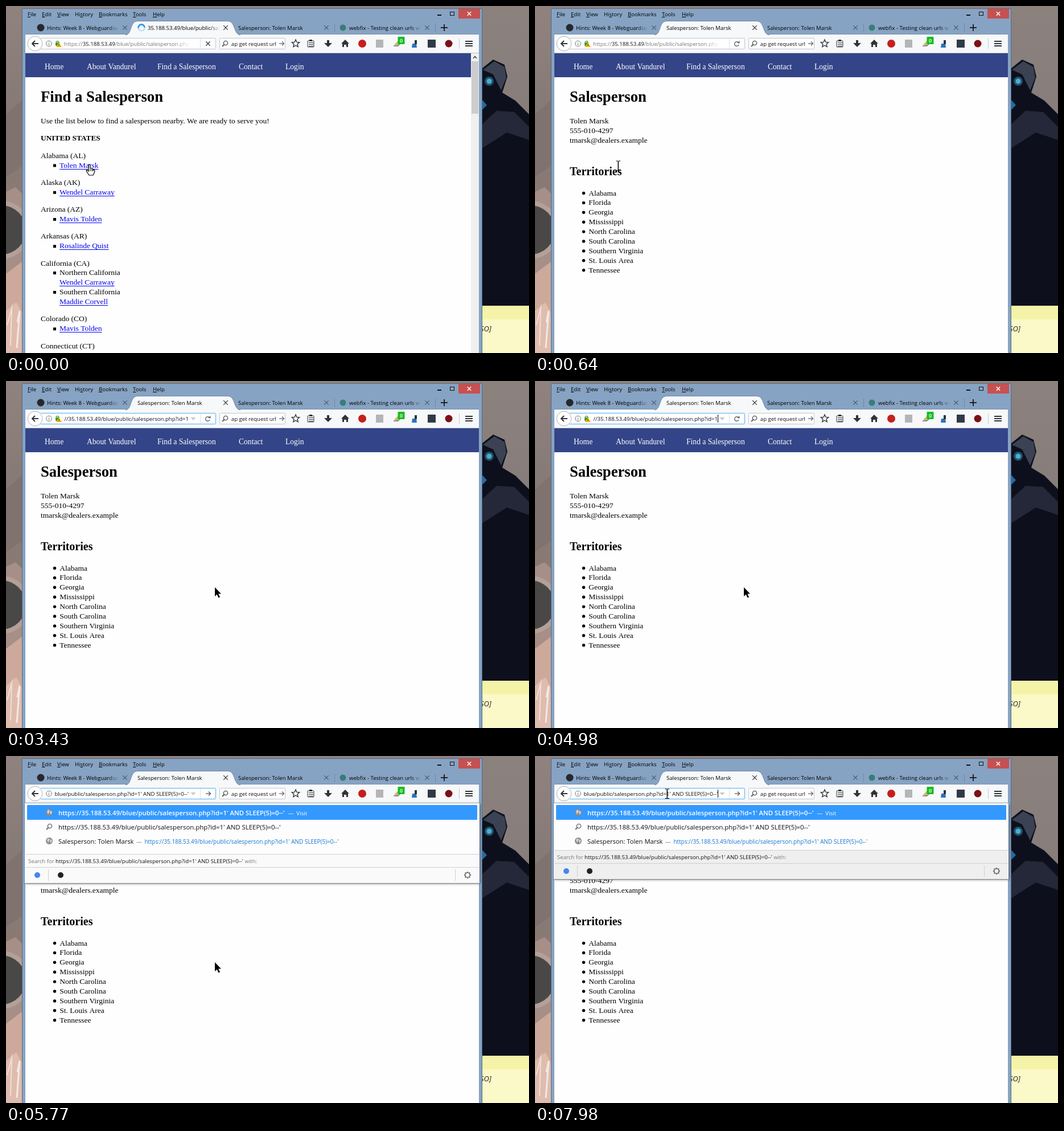
Animation, 919 px wide and 609 px high, one loop 8000 ms. Source, as an HTML page with a canvas:

```html
<!DOCTYPE html>
<html lang="en">
<head>
<meta charset="utf-8">
<title>Browser session</title>
<style>
html, body { margin: 0; width: 100%; height: 100%; overflow: hidden; }
canvas { display: block; }
</style>
</head>
<body>
<canvas id="stage" width="919" height="609"></canvas>
<script>
const c = document.getElementById('stage').getContext('2d');
const LOOP = 8000;
const PERSON = 'Tolen Marsk';
const HOST = '35.188.53.49';
const PATH = '/blue/public/salesperson.php';
const URL_ID = `https://${HOST}${PATH}?id=1`;
const URL_FULL = `${URL_ID}' AND SLEEP(5)=0--'`;

const sans = (size, weight = 400) => `${weight} ${size}px "Open Sans", "Noto Sans", sans-serif`;
const serif = (size, weight = 400) => `${weight} ${size}px "Liberation Serif", serif`;
const UI = sans(9.6);
const BODY = serif(13.5);

function rect(x, y, w, h, color) {
  c.fillStyle = color;
  c.fillRect(x, y, w, h);
}

function text(s, x, y, font = BODY, color = '#000', align = 'left') {
  c.font = font;
  c.fillStyle = color;
  c.textAlign = align;
  c.fillText(s, x, y);
  return c.measureText(s).width;
}

function dot(x, y, r, color) {
  c.fillStyle = color;
  c.beginPath();
  c.arc(x, y, r, 0, 7);
  c.fill();
}

function ring(x, y, r, color, width = 1, from = 0, to = 7) {
  c.strokeStyle = color;
  c.lineWidth = width;
  c.beginPath();
  c.arc(x, y, r, from, to);
  c.stroke();
}

function trace(points, x = 0, y = 0) {
  c.beginPath();
  for (let i = 0; i < points.length; i += 2) c.lineTo(x + points[i], y + points[i + 1]);
}

function line(points, color, width = 1) {
  trace(points);
  c.strokeStyle = color;
  c.lineWidth = width;
  c.stroke();
}

function poly(points, color, x = 0, y = 0) {
  trace(points, x, y);
  c.closePath();
  c.fillStyle = color;
  c.fill();
}

function box(x, y, w, h, r, fill, stroke) {
  c.beginPath();
  c.roundRect(x, y, w, h, r);
  c.fillStyle = fill;
  c.fill();
  if (stroke) {
    c.strokeStyle = stroke;
    c.lineWidth = 1;
    c.stroke();
  }
}

function clipped(x, y, w, h, draw) {
  c.save();
  c.beginPath();
  c.rect(x, y, w, h);
  c.clip();
  draw();
  c.restore();
}

function gradient(x0, y0, x1, y1, ...colors) {
  const g = c.createLinearGradient(x0, y0, x1, y1);
  colors.forEach((color, i) => g.addColorStop(i / (colors.length - 1), color));
  return g;
}

function fadedText(s, x, y, end) {
  const fade = gradient(end - 18, 0, end, 0, 'rgba(0,0,0,1)', 'rgba(0,0,0,0)');
  clipped(x, y - 14, end - x, 20, () => text(s, x, y, UI, fade));
}

function cross(x, y, r, color, width = 1.2) {
  line([x - r, y - r, x + r, y + r], color, width);
  line([x - r, y + r, x + r, y - r], color, width);
}

function arrowRight(x, y, color) {
  line([x - 4, y, x + 4, y], color, 1.3);
  line([x + 1, y - 3.5, x + 4.5, y, x + 1, y + 3.5], color, 1.3);
}

function magnifier(x, y, color) {
  ring(x + 1, y - 1, 3.6, color, 1.4);
  line([x - 1.5, y + 1.5, x - 5, y + 5], color, 1.8);
}

function drawWallpaper() {
  rect(0, 0, 919, 609, gradient(0, 0, 0, 609, '#8f827f', '#857975', '#8d7a73', '#bd9d92'));
  poly([0, 190, 29, 165, 29, 280, 0, 300], '#80726e');
  poly([0, 326, 17, 318, 29, 330, 29, 470, 0, 470], '#a68f87');
  dot(-8, 393, 51, '#b3a098');
  dot(-8, 393, 43, '#4a4747');
  poly([0, 470, 29, 448, 29, 609, 0, 609], '#cda99b');
  poly([0, 535, 18, 520, 29, 540, 29, 609, 0, 609], '#dfbcae');
  line([2, 560, 10, 530, 8, 596], '#eee0d8', 2);
  line([20, 555, 24, 535, 19, 600], '#f4e8e2', 3);

  rect(832, 0, 87, 526, gradient(0, 0, 0, 526, '#8b817d', '#857b79', '#65606a'));
  poly([836, 110, 856, 94, 876, 103, 881, 124, 872, 152, 895, 166, 919, 190,
    919, 526, 836, 526], '#0d101c');
  poly([838, 112, 858, 97, 876, 107, 879, 126, 870, 148, 856, 120], '#3a4253');
  poly([836, 208, 862, 184, 893, 186, 919, 212, 919, 235, 880, 222, 836, 250], '#242838');
  dot(849, 132, 8, '#24516a');
  dot(849, 132, 4.5, '#46b0d0');
  poly([837, 165, 845, 174, 837, 182], '#236ba4');

  rect(832, 526, 87, 83, '#fbf9c7');
  rect(832, 526, 87, 24, '#f5f3a7');
  text('SO]', 833, 571, 'italic 13px "Noto Sans", sans-serif', '#35352b');
}

function drawTab(x, title, titleX) {
  fadedText(title, titleX, 41.5, x + 142);
  cross(x + 153, 38, 3.7, '#4d5a6a');
}

function drawWindow() {
  rect(28, 4, 809, 605, '#87a3c3');
  line([28.5, 609, 28.5, 4.5, 836.5, 4.5, 836.5, 609], '#536b87');
  const menus = [['File', 38], ['Edit', 63], ['View', 90], ['History', 121], ['Bookmarks', 163], ['Tools', 223], ['Help', 258]];
  for (const [label, x] of menus) {
    text(label, x, 17.5, UI);
    const at = label === 'History' ? 2 : 0;
    const before = c.measureText(label.slice(0, at)).width;
    rect(x + before, 19, c.measureText(label[at]).width, 1, '#000');
  }
  rect(758, 15, 7, 2, '#111');
  c.strokeStyle = '#111';
  c.strokeRect(780.5, 10.5, 7, 6);
  rect(795, 5, 38, 17, '#c75050');
  cross(814, 13.5, 3.2, '#fff', 1.5);
  rect(34, 50, 797, 33, '#f6f8fa');
  line([34, 49.5, 831, 49.5], '#768fac');
  line([34, 82.5, 831, 82.5], '#bcc4ce');
  line([577.5, 31, 577.5, 46], '#6f88a5');
  line([754.5, 31, 754.5, 46], '#6f88a5');
  dot(61, 38, 6.5, '#25282d');
  drawTab(56, 'Hints: Week 8 - Webguardianship', 72);
  drawTab(410, `Salesperson: ${PERSON}`, 408);
  dot(592, 38, 5.5, '#397d78');
  drawTab(587, 'webfix - Testing clean urls with it', 603);
  line([764, 38, 776, 38], '#111', 1.7);
  line([770, 32, 770, 44], '#111', 1.7);
  c.beginPath();
  c.moveTo(210, 51);
  c.bezierCurveTo(222, 50, 217, 27, 231, 26.5);
  c.lineTo(390, 26.5);
  c.bezierCurveTo(404, 27, 399, 50, 412, 51);
  c.fillStyle = '#f6f8fa';
  c.fill();
  c.strokeStyle = '#7189a6';
  c.lineWidth = 1;
  c.stroke();
  cross(386, 38, 3.8, '#333');
}

function drawActiveTab(t) {
  const loading = t < 520;
  if (loading) {
    ring(238, 38, 5.5, '#c1ddf6', 2.5);
    const turn = t < 120 ? 3 : t < 370 ? 4.3 : 5.6;
    ring(238, 38, 5.5, '#2493e6', 2.5, turn, turn + 3.2);
  }
  const title = t < 370 ? `${HOST}/blue/public/salesperson` : `Salesperson: ${PERSON}`;
  fadedText(title, loading ? 249 : 231, 41.5, 376);
}

function drawToolbarIcons() {
  box(375.5, 56.5, 115, 19, 1, '#fff', '#bfc6ce');
  magnifier(385, 66, '#555');
  clipped(396, 57, 82, 18, () => text('zap get request url', 475, 69.5, UI, '#111', 'right'));
  arrowRight(484, 66, '#666');

  const star = [];
  for (let i = 0; i < 10; i++) {
    const r = i % 2 ? 3.2 : 7, a = i * Math.PI / 5 - Math.PI / 2;
    star.push(509 + r * Math.cos(a), 66 + r * Math.sin(a));
  }
  trace(star);
  c.closePath();
  c.strokeStyle = '#333';
  c.lineWidth = 1.4;
  c.stroke();

  box(530, 61, 11, 11, 1, '#f6f8fa', '#333');
  rect(533, 59, 5, 3, '#333');
  for (const y of [64, 67, 70]) rect(532, y, 8, 1, '#333');
  rect(564, 60, 4, 6, '#333');
  poly([559, 65, 573, 65, 566, 72], '#333');
  poly([589, 66, 596, 59, 603, 66, 601, 66, 601, 72, 598, 72, 598, 68, 594, 68, 594, 72, 591, 72, 591, 66], '#333');
  dot(626, 66, 7, '#c81d1d');
  rect(650, 59, 13, 14, '#b5b5b5');
  poly([682, 68, 690, 60, 694, 64, 688, 70], '#cbb76b');
  line([681, 70, 689, 70, 695, 64], '#333');
  box(688.5, 54, 12, 13, 1, '#18bd20');
  text('0', 694.5, 64, sans(9, 600), '#fff', 'center');
  poly([714, 66, 721, 66, 722, 73, 713, 73], '#2873be');
  rect(718, 60, 4, 7, '#333');
  rect(741, 59, 14, 14, '#303a46');
  dot(778, 66, 6.5, '#7c1015');
  line([796.5, 57, 796.5, 75], '#c5cbd2');
  for (const y of [61, 65, 69]) rect(807, y, 13, 2, '#333');
}

function drawAddressBar(t, caret) {
  const focused = t >= 1410, pasted = t >= 5380;
  box(60.5, 56.5, 308, 19, 1, '#fff', focused ? '#55aeee' : '#bfc6ce');
  dot(51, 66, 13, '#fff');
  ring(51, 66, 12.8, '#abb5c0');
  line([46, 66, 57, 66], '#333', 2);
  line([51, 61, 46, 66, 51, 71], '#333', 2);
  ring(75.5, 66, 4.8, '#777');
  rect(75, 65, 1, 4, '#777');
  rect(75, 63, 1, 1, '#777');
  if (!pasted) {
    box(87, 64, 7, 6, 1, '#3ba02e');
    ring(90.5, 64, 2.4, '#3ba02e', 1.3, Math.PI, 7);
    poly([93, 64, 98, 72, 88, 72], '#f2b400');
    rect(92.5, 67, 1, 3, '#333');
  }

  const left = pasted ? 86 : 102;
  clipped(left, 57, 322 - left, 18, () => {
    if (t < 1410) {
      const fade = gradient(296, 0, 321, 0, '#777', 'rgba(119,119,119,0.1)');
      let x = 102;
      x += text('https://', x, 69.5, UI, '#777');
      x += text(HOST, x, 69.5, UI, '#111');
      text(PATH, x, 69.5, UI, fade);
    } else if (t < 2710) {
      rect(102, 59, 219, 14, '#3399ff');
      text(`https://${HOST}${PATH}`, 102, 69.5, UI, '#fff');
    } else {
      text(pasted ? URL_FULL : URL_ID, 321, 69.5, UI, '#111', 'right');
    }
  });
  if (caret) rect(321, 59, 1, 14, '#000');
  if (focused) poly([324.5, 64, 333.5, 64, 329, 69], '#c6c9cd');
  line([341.5, 57, 341.5, 75], '#dde1e5');
  if (t < 520) cross(355, 66, 3.6, '#555', 1.5);
  else if (pasted) arrowRight(355, 66, '#555');
  else {
    ring(354.5, 66.5, 3.8, '#666', 1.4, 0.4, 5.5);
    poly([355, 65, 359.5, 61, 359.5, 65.5], '#666');
  }
}

function drawNav(width) {
  rect(34, 83, width, 42, '#334488');
  const items = [['Home', 68], ['About Vandurel', 142], ['Find a Salesperson', 266], ['Contact', 409], ['Login', 491]];
  for (const [label, x] of items) text(label, x, 110.5, serif(13.6), '#fff');
}

function link(name, y) {
  rect(94, y + 2, text(name, 94, y, BODY, '#0000ee'), 1, '#0000ee');
}

function drawListPage() {
  drawNav(783);
  text('Find a Salesperson', 61, 168, serif(26.7, 700));
  text('Use the list below to find a salesperson nearby. We are ready to serve you!', 61, 206);
  text('UNITED STATES', 61, 236, serif(13.4, 700));
  const bullet = y => rect(83, y - 6, 5, 5, '#000');
  const states = [
    ['Alabama (AL)', PERSON, 266.5], ['Alaska (AK)', 'Wendel Carraway', 313.8],
    ['Arizona (AZ)', 'Mavis Tolden', 361], ['Arkansas (AR)', 'Rosalinde Quist', 408.3],
    ['Colorado (CO)', 'Mavis Tolden', 553.3], ['Connecticut (CT)', 'Barton Fleswick', 600.5]
  ];
  for (const [state, name, y] of states) {
    text(state, 61, y);
    bullet(y + 17);
    link(name, Math.round(y + 17));
  }
  text('California (CA)', 61, 455.5);
  [['Northern', 'Wendel Carraway', 472], ['Southern', 'Maddie Corvell', 506]].forEach(([area, name, y]) => {
    bullet(y);
    text(`${area} California`, 94, y);
    link(name, y + 17);
  });
  rect(817, 83, 14, 526, '#f0f0f0');
  rect(818, 97, 12, 92, '#cdcdcd');
  line([821, 92, 824, 88.5, 827, 92], '#444', 1.6);
}

function drawPersonPage() {
  drawNav(797);
  text('Salesperson', 61, 168, serif(26.7, 700));
  [PERSON, '555-010-4297', 'tmarsk@dealers.example'].forEach((s, i) => text(s, 61, 206 + i * 17));
  text('Territories', 61, 297, serif(20, 700));
  const areas = ['Alabama', 'Florida', 'Georgia', 'Mississippi', 'North Carolina', 'South Carolina',
    'Southern Virginia', 'St. Louis Area', 'Tennessee'];
  areas.forEach((area, i) => {
    const y = 332.5 + i * 16.9;
    dot(85.5, y - 4, 2.7, '#000');
    text(area, 94.3, y);
  });
}

function globe(x, y) {
  dot(x, y, 6, '#8a8a8a');
  poly([-4, -2, -1, -5, 1, -2, -1, 1, -2, 4], '#d5d5d5', x, y);
  poly([2, -3, 5, -1, 3, 4, 1, 1], '#d5d5d5', x, y);
}

function drawPopup(t) {
  const bottom = t < 5770 ? 398 : t < 5920 ? 223 : t < 6040 ? 219 : 216;
  const footer = bottom - 51;
  c.save();
  c.shadowColor = 'rgba(0,0,0,0.55)';
  c.shadowBlur = 4;
  c.shadowOffsetX = c.shadowOffsetY = 1;
  rect(33, 83, 799, bottom - 83, '#fdfdfd');
  c.restore();
  rect(34, footer, 797, 51, t < 5920 ? '#fafafa' : '#efefef');
  line([34, footer + 0.5, 831, footer + 0.5], '#cfcfcf');
  line([34, bottom - 27.5, 831, bottom - 27.5], '#cfcfcf');
  line([33, bottom + 0.5, 832, bottom + 0.5], '#858585');
  box(37, 86, 791, 26, 1, '#3399ff');
  if (t >= 6810 && t < 6930) box(37.5, 137.5, 790, 24, 1, '#efefef', '#dedede');

  globe(76, 99);
  let x = 92 + text(URL_FULL, 92, 104, sans(11.3, 600), '#fff');
  text('—  Visit', x + 6, 103.5, sans(9.8), '#fff');
  magnifier(76, 124, '#666');
  text(URL_FULL, 92, 129, sans(11.4), '#111');
  globe(76, 149);
  text(`Salesperson: ${PERSON}`, 92, 154, sans(11.2), '#111');
  text('—', 229, 154, sans(9.9), '#888');
  text(t < 5520 ? URL_ID : URL_FULL, 243.5, 154, sans(9.95), '#1878d2');

  const y = footer + 16;
  x = 39 + text('Search for ', 39, y, UI, '#777');
  x += text(URL_FULL, x, y, sans(9.65), '#111');
  text(' with:', x, y, UI, '#777');
  const mid = bottom - 14;
  dot(55, mid, 5, '#4285f4');
  line([74.5, mid - 10, 74.5, mid + 10], '#cfcfcf');
  dot(96, mid, 5, '#222');
  line([789.5, mid - 10, 789.5, mid + 10], '#cfcfcf');
  ring(811, mid, 4.2, '#666', 1.6);
  for (let i = 0; i < 8; i++) {
    const a = i * Math.PI / 4;
    dot(811 + 5.3 * Math.cos(a), mid + 5.3 * Math.sin(a), 1, '#666');
  }
}

const cursors = {
  arrow(x, y) {
    trace([0, 0, 0, 16, 3.7, 12.5, 6.5, 18.5, 9, 17.3, 6.2, 11.5, 11, 11.5], x, y);
    c.closePath();
    c.strokeStyle = '#fff';
    c.lineWidth = 1.5;
    c.stroke();
    c.fillStyle = '#000';
    c.fill();
  },
  hand(x, y) {
    trace([4, 0, 6, 0, 7, 2, 7, 7, 10, 7, 13, 9, 15, 11, 14, 15, 12, 19, 5, 19, 1, 13, 0, 10, 2, 10, 4, 12], x, y);
    c.closePath();
    c.fillStyle = '#fff';
    c.fill();
    c.strokeStyle = '#000';
    c.lineWidth = 1.2;
    c.stroke();
    for (const dx of [7, 10, 12]) line([x + dx, y + 8, x + dx, y + 12], '#000');
  },
  beam(x, y) {
    rect(x - 0.5, y - 8, 1.5, 17, '#000');
    for (const dy of [-8.5, 8]) {
      rect(x - 3.5, y + dy, 3, 1, '#000');
      rect(x + 1, y + dy, 3, 1, '#000');
    }
  }
};

const cursorSteps = [
  [0, 'hand', 141, 278], [370, 'hand', 139, 280], [520, 'beam', 146, 280],
  [780, 'arrow', 219, 181], [900, 'hand', 280, 87], [1150, 'beam', 315, 72],
  [1270, 'arrow', 321, 75], [1410, 'beam', 325, 66], [1790, 'beam', 321, 68],
  [1910, 'arrow', 314, 190], [2060, 'arrow', 367, 362], [6540, 'arrow', 340, 268],
  [6660, 'arrow', 301, 164], [6810, 'arrow', 225, 101], [7070, 'arrow', 226, 93],
  [7200, 'arrow', 228, 80], [7320, 'beam', 231, 71], [7440, 'beam', 232, 70],
  [7580, 'beam', 232, 68], [7710, 'beam', 232, 66]
];
const caretToggles = [2710, 3430, 3830, 4350, 4980, 5520, 5920, 6540, 7070, 7580, 7860];

function draw(t) {
  drawWallpaper();
  drawWindow();
  drawActiveTab(t);
  drawToolbarIcons();
  drawAddressBar(t, caretToggles.filter(at => at <= t).length % 2 === 1);
  rect(34, 83, 797, 526, '#fefefe');
  clipped(34, 83, 797, 526, t < 520 ? drawListPage : drawPersonPage);
  if (t >= 5380) drawPopup(t);
  const [, kind, x, y] = cursorSteps.findLast(step => step[0] <= t);
  cursors[kind](x, y);
}

const start = performance.now();
function tick() {
  draw((performance.now() - start) % LOOP);
  requestAnimationFrame(tick);
}
tick();
</script>
</body>
</html>
```
